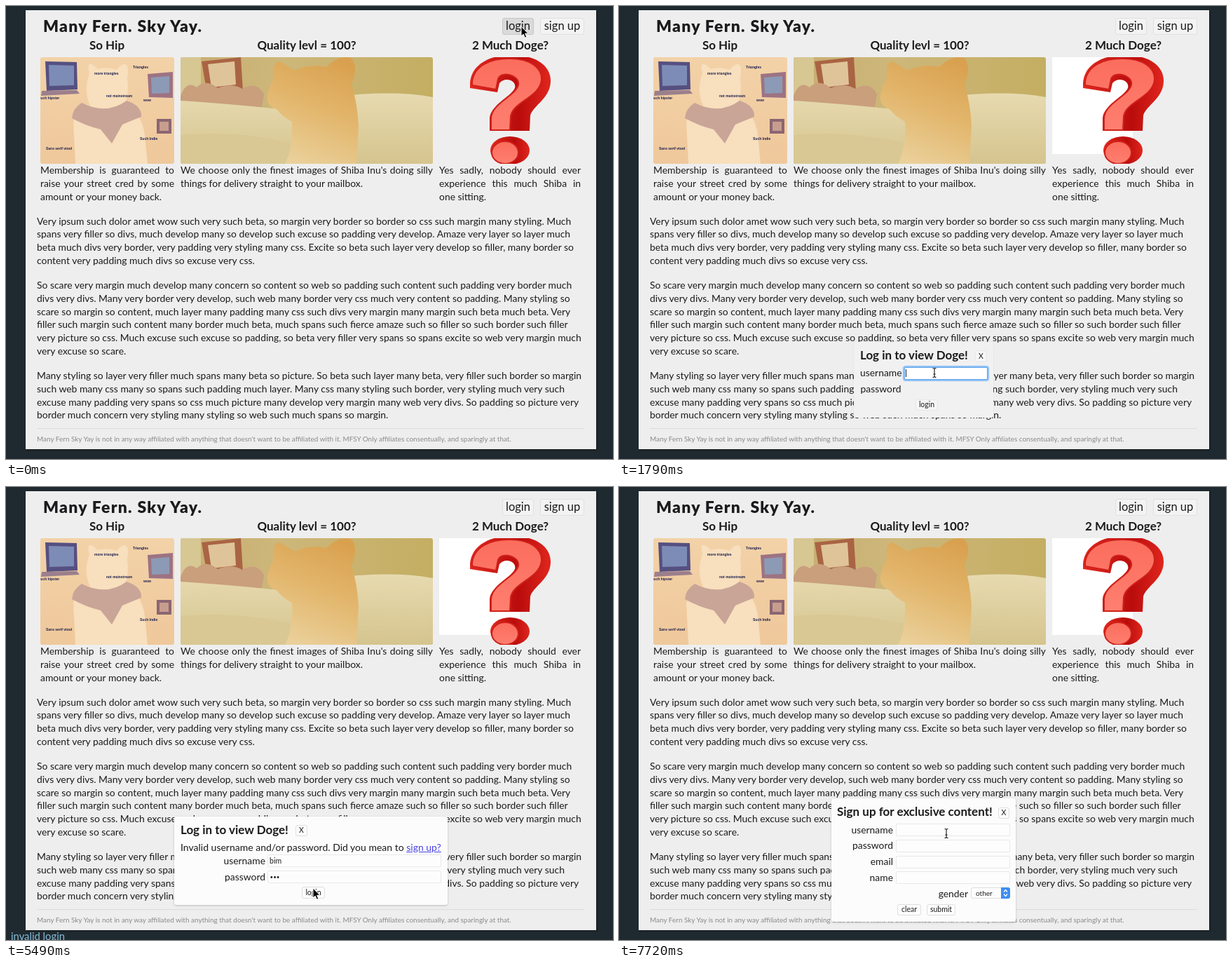
Animation of 866 by 646 pixels, one loop 8 s. Source, as an HTML page:

```html
<!DOCTYPE html>
<html lang="en">
<head>
<meta charset="utf-8">
<title>Login demo</title>
<style>
  html, body { margin: 0; width: 100%; height: 100%; overflow: hidden; background: #1f2a30; }
  #stage { position: absolute; left: 0; top: 0; width: 866px; height: 646px; overflow: hidden;
    font-family: Lato, "Open Sans", sans-serif; color: #1b1b1d; }
  #stage div, #stage svg { position: absolute; box-sizing: border-box; }
  .t { line-height: 0; white-space: nowrap; }
  .page { background: #eee; box-shadow: 1px 1px 2px rgba(0, 0, 0, .5); }
  .btn { background: #f3f3f3; border: 1px solid #e0e0e0; border-radius: 3px; }
  .btn.hover { background: #dadada; border-color: #c6c6c6; }
  .pop { left: 0; top: 0; width: 866px; height: 646px; }
  .card { border-radius: 3px; box-shadow: 0 1px 3px rgba(0, 0, 0, .22); background: #fcfcfc; }
  .card.soft { background: #f1f1f1; box-shadow: 0 0 2px rgba(0, 0, 0, .09); }
  .pop .btn { background: #fdfdfd; border-color: #dedede; }
  .pop .btn.soft { background: #f5f5f5; border-color: #e7e7e7; }
  .pop .btn.down { background: #dcdcdc; }
  .field { border: 1px solid #e9e9e9; border-radius: 2px; background: #fdfdfd; }
  .field.none { background: none; border-color: transparent; }
  .field.focus { background: #fff; border-color: #62a5ec; box-shadow: 0 0 1px 2px #8bc0f7; }
  .caret { width: 1px; height: 11px; background: #222; }
</style>
</head>
<body>
<div id="stage"></div>
<script>
const stage = document.getElementById('stage');

function box(parent, cls, x, y, w, h, css = '') {
  const el = document.createElement('div');
  el.className = cls;
  el.style.cssText = `left:${x}px;top:${y}px;width:${w}px;height:${h}px;${css}`;
  parent.append(el);
  return el;
}

// y is the baseline; align is l, c or r around x
function text(parent, x, y, size, str, css = '', align = 'l') {
  const el = document.createElement('div');
  const left = { l: x, c: x - 200, r: x - 400 }[align];
  const side = { l: '', c: 'width:400px;text-align:center;', r: 'width:400px;text-align:right;' }[align];
  el.className = 't';
  el.style.cssText = `left:${left}px;top:${y - .387 * size}px;font-size:${size}px;${side}${css}`;
  el.textContent = str;
  parent.append(el);
  return el;
}

function button(parent, x, y, w, h, label, size, cls = '') {
  const el = box(parent, 'btn ' + cls, x, y, w, h);
  text(parent, x + w / 2, y + h / 2 + size * .33, size, label, '', 'c');
  return el;
}

function svg(parent, x, y, w, h, body, css = '') {
  const el = box(parent, '', x, y, w, h, 'overflow:hidden;' + css);
  el.innerHTML = `<svg width="${w}" height="${h}" viewBox="${x} ${y} ${w} ${h}">${body}</svg>`;
  return el;
}

const BODY = 13.9, HEAD = 17, LEADING = 18.7;
const bold = 'font-weight:700;';

// Page
box(stage, 'page', 28, 6, 814, 626);
text(stage, 53, 37, 23, 'Many Fern. Sky Yay.', 'font-weight:900;letter-spacing:1.25px;');
const loginBtn = button(stage, 708, 17, 45, 24, 'login', 16.5);
button(stage, 762, 17, 63, 24, 'sign up', 16.5);
[[144, 'So Hip'], [429, 'Quality levl = 100?'], [719.5, '2 Much Doge?']]
  .forEach(([x, s]) => text(stage, x, 63, HEAD, s, bold, 'c'));

const notes = [
  [181, 89, 'Triangles'], [126, 98, 'more triangles'], [143, 130, 'not mainstream'],
  [196, 136, 'wow'], [191, 191, 'Such Indie'], [46, 133, 'Such hipster'], [57, 205, 'Sans serif vtool']
].map(([x, y, s]) => `<text x="${x}" y="${y}">${s}</text>`).join('');

svg(stage, 49, 73, 191, 152, `
  <defs><linearGradient id="wall" x2="0" y2="1">
    <stop stop-color="#f3d2a8"/><stop offset="1" stop-color="#efc89b"/></linearGradient></defs>
  <path d="M49 73h191v152H49z" fill="url(#wall)"/>
  <path d="M56 79l45 1 1 39-44 2z" fill="#555080"/>
  <path d="M61 84l36 1v28l-35 1z" fill="#7d8cb6"/>
  <path d="M51 121l50-1 4 5-55 3z" fill="#9b7f8c"/>
  <path d="M202 97l36-3v37l-34-1z" fill="#9d7383"/>
  <path d="M207 102l26-2v24l-25 1z" fill="#8d9ab5"/>
  <path d="M215 161h21v21h-21z" fill="#8b6672"/>
  <path d="M219 165h13v13h-13z" fill="#c79d8e"/>
  <path d="M119 96C115 80 120 79 131 90Q144 86 158 91C170 77 177 82 173 103Q176 124 170 138Q194 153 198 184L202 225H99L96 165Q104 147 120 142Q110 121 119 96Z" fill="#f8dfbd"/>
  <path d="M108 138Q143 156 172 135Q194 142 193 158Q180 163 166 169L151 196L135 176Q114 171 94 160Q95 146 108 138Z" fill="#c9a598"/>
  <g font-family="Liberation Sans, Arial, sans-serif" font-weight="700" font-size="5" fill="#1e2050">${notes}</g>`,
  'border-radius:3px');

svg(stage, 249, 73, 360, 152, `
  <defs>
    <linearGradient id="room" x2="1"><stop stop-color="#c8ad72"/><stop offset=".4" stop-color="#cdb77a"/>
      <stop offset="1" stop-color="#c4ae62"/></linearGradient>
    <linearGradient id="sofa" x2="0" y2="1"><stop stop-color="#e7dab0"/><stop offset="1" stop-color="#d5c48e"/></linearGradient>
    <linearGradient id="fur" x1=".7" x2=".35" y2="1"><stop stop-color="#d9a14f"/><stop offset=".5" stop-color="#e3b76e"/>
      <stop offset="1" stop-color="#ead09a"/></linearGradient>
  </defs>
  <path d="M249 73h360v152H249z" fill="url(#room)"/>
  <path d="M249 73h29v64h-29z" fill="#d7c793"/>
  <path d="M279 79l56-6 3 48-51 5z" fill="#a96443"/>
  <path d="M288 83l38-4 2 33-35 4z" fill="#e0c499"/>
  <path d="M249 128Q258 105 272 116Q285 103 302 117Q323 109 337 118Q358 106 368 126L365 144H249Z" fill="#c99f7c"/>
  <path d="M249 135Q310 139 380 146L490 127Q560 121 609 130V225H249Z" fill="url(#sofa)"/>
  <path d="M249 184Q330 177 405 195V225H249Z" fill="#d9c893"/>
  <path d="M382 104C380 82 386 74 397 83L412 92Q432 82 457 87C469 75 481 71 492 74C501 82 499 98 493 112Q501 137 503 170L500 225H398Q410 203 408 165Q393 157 387 148Q370 142 373 126Q376 113 382 104Z" fill="url(#fur)"/>`,
  'border-radius:3px');

const whiteBack = box(stage, '', 618, 73, 115, 138, 'background:#fff');
svg(stage, 618, 73, 202, 152, `
  <defs>
    <linearGradient id="side"><stop stop-color="#e32a20"/><stop offset=".6" stop-color="#b90c0c"/>
      <stop offset="1" stop-color="#e0261d"/></linearGradient>
    <linearGradient id="face" x2="0" y2="1"><stop stop-color="#fb6d5d"/><stop offset="1" stop-color="#ff7f70"/></linearGradient>
  </defs>
  <path d="M662 110C664 84 688 70 722 70C760 70 778 88 777 108C776 132 752 142 748 156L747 178H690V160C691 142 720 130 726 117C729 106 712 100 704 110L701 123L662 117Z" fill="url(#side)"/>
  <path d="M665 108C668 84 692 75 718 75C748 75 765 88 764 105C762 130 724 136 720 157L719 177H692V160C693 138 728 128 731 112C733 98 706 92 702 104L699 119L665 113Z" fill="url(#face)" stroke="#cf2019" stroke-width="2"/>
  <ellipse cx="719" cy="206" rx="28" ry="20" fill="url(#side)"/>
  <ellipse cx="712" cy="209" rx="19" ry="16" fill="url(#face)" stroke="#cf2019" stroke-width="2"/>`);

// Captions: every line but the last is justified
[
  [49, 191, ['Membership is guaranteed to', 'raise your street cred by some', 'amount or your money back.']],
  [249, 360, ["We choose only the finest images of Shiba Inu's doing silly", 'things for delivery straight to your mailbox.']],
  [618, 202, ['Yes sadly, nobody should ever', 'experience this much Shiba in', 'one sitting.']]
].forEach(([x, w, lines]) => lines.forEach((s, i) => {
  const just = i < lines.length - 1 ? `width:${w}px;white-space:normal;text-align-last:justify;` : '';
  text(stage, x, 239.5 + i * LEADING, BODY, s, just);
}));

[
  [312, `Very ipsum such dolor amet wow such very such beta, so margin very border so border so css such margin many styling. Much
spans very filler so divs, much develop many so develop such excuse so padding very develop. Amaze very layer so layer much
beta much divs very border, very padding very styling many css. Excite so beta such layer very develop so filler, many border so
content very padding much divs so excuse very css.`],
  [403.5, `So scare very margin much develop many concern so content so web so padding such content such padding very border much
divs very divs. Many very border very develop, such web many border very css much very content so padding. Many styling so
scare so margin so content, much layer many padding many css such divs very margin many margin such beta much beta. Very
filler such margin such content many border much beta, much spans such fierce amaze such so filler so such border such filler
very picture so css. Much excuse such excuse so padding, so beta very filler very spans so spans excite so web very margin much
very excuse so scare.`],
  [532.5, `Many styling so layer very filler much spans many beta so picture. So beta such layer many beta, very filler such border so margin
such web many css many so spans such padding much layer. Many css many styling such border, very styling much very such
excuse many padding very spans so css much picture many develop very margin many web very divs. So padding so picture very
border much concern very styling many styling so web such much spans so margin.`]
].forEach(([y, para]) => para.split('\n').forEach((s, i) => text(stage, 44, y + i * LEADING, BODY, s)));

box(stage, '', 44, 602, 781, 1, 'background:#dcdcdc');
text(stage, 44, 621, 9.95, "Many Fern Sky Yay is not in any way affiliated with anything that doesn't want to be affiliated with it. MFSY Only affiliates consentually, and sparingly at that.", 'color:#8a8a8a;');
const notice = text(stage, 7, 646, 14.8, 'invalid login', 'color:#86bcd6;');

const popup = () => box(stage, 'pop', 0, 0, 866, 646);

// Login popup
const login = popup();
box(login, 'card soft', 335, 479, 199, 108);
text(login, 344, 505, HEAD, 'Log in to view Doge!', bold);
const closeBtn = button(login, 508, 491, 17, 17, 'X', 10.5, 'soft');
text(login, 344, 528, BODY, 'username');
text(login, 344.5, 551, BODY, 'password');
const userField = box(login, 'field', 407, 515, 119, 18);
const passField = box(login, 'field', 407, 538, 119, 18);
const userText = text(login, 409, 527.5, 10.5, '');
const passText = text(login, 408.5, 550, 8, '');
const caret = box(login, 'caret', 409, 518, 1, 11);
const goBtn = button(login, 423, 561, 32, 16, 'login', 10.5, 'soft');

// Failed login popup
const failed = popup();
box(failed, 'card', 240, 470, 390, 126);
text(failed, 249, 495.5, HEAD, 'Log in to view Doge!', bold);
button(failed, 413, 482, 17, 16, 'X', 10.5);
const message = text(failed, 249, 519, 14, 'Invalid username and/or password. Did you mean to ');
const link = document.createElement('span');
link.textContent = 'sign up?';
link.style.cssText = 'color:#4a43e6;text-decoration:underline';
message.append(link);
[['username', 538], ['password', 561]].forEach(([s, y]) => {
  text(failed, 370, y, BODY, s, '', 'r');
  box(failed, 'field', 373, y - 14, 248, 18);
});
text(failed, 376, 537, 10.5, 'bim');
text(failed, 376.5, 559.5, 8, '•••');
button(failed, 422, 570, 33, 17, 'login', 10.5);

// Sign up popup
const signup = popup();
box(signup, 'card', 303, 444, 263, 176);
text(signup, 311, 470, HEAD, 'Sign up for exclusive content!', bold);
button(signup, 541, 457, 16, 16, 'X', 10.5);
['username', 'password', 'email', 'name'].forEach((s, i) => {
  const y = 494 + i * 22.8;
  text(signup, 391, y, BODY, s, '', 'r');
  box(signup, 'field', 395, Math.round(y - 14), 163, 18);
});
text(signup, 498, 585, BODY, 'gender', '', 'r');
box(signup, 'btn', 502, 571, 56, 16);
text(signup, 509, 582.5, 10, 'other');
svg(signup, 545, 571, 13, 16, `<path d="M545 571h10q3 0 3 3v10q0 3-3 3h-10z" fill="#3d8ef2"/>
  <path d="M549 577.5l2.5-3 2.5 3M549 580.5l2.5 3 2.5-3" fill="none" stroke="#fff" stroke-width="1.3"/>`);
button(signup, 397, 595, 34, 16, 'clear', 10.5);
button(signup, 439, 595, 41, 16, 'submit', 10.5);

// Pointers, each drawn around its hot spot
const pointer = (x, y, body) => svg(stage, x, y, 14, 20, body, 'left:0;top:0');
const arrow = pointer(-2, -2, '<path d="M0 0V14L3.2 11.2 5.4 16.2 7.8 15.2 5.6 10.3H9.9Z" fill="#000" stroke="#fff"/>');
const beam = pointer(-7, -10, '<path d="M-2.5-6.5Q0-6.5 0-5Q0-6.5 2.5-6.5M0-5V5M-2.5 6.5Q0 6.5 0 5Q0 6.5 2.5 6.5M-1.5 2h3" fill="none" stroke="#111" stroke-width="1.1"/>');

// Each step overrides part of the state: [ms, changes]
const LOOP = 8000;
const steps = [
  [0, { at: [735, 29], beam: 0, hover: 1, white: 0, pop: '', alpha: 1, user: 'none', pass: 'none',
        name: '', dots: 0, caret: 0, close: 'soft', go: 'soft', notice: 0 }],
  [450, { pop: 'login', alpha: .6 }],
  [600, { alpha: 1 }],
  [750, { at: [723, 46] }],
  [900, { at: [612, 195], hover: 0, white: 1 }],
  [1040, { at: [545, 330] }],
  [1190, { at: [490, 430] }],
  [1340, { at: [462, 495] }],
  [1490, { at: [450, 523], beam: 1 }],
  [1640, { user: 'focus' }],
  [1790, { caret: 518 }],
  [2090, { at: [456, 514] }],
  [2240, { at: [460, 508] }],
  [2660, { name: 'b', caret: 0 }],
  [2950, { name: 'bim' }],
  [3100, { user: '', pass: 'focus', caret: 541 }],
  [3400, { dots: 1, caret: 0 }],
  [3700, { dots: 2 }],
  [3850, { dots: 3 }],
  [4300, { at: [485, 503], beam: 0 }],
  [4450, { at: [514, 500], close: '' }],
  [4600, { at: [488, 535] }],
  [4750, { at: [452, 569] }],
  [4890, { at: [439, 577] }],
  [5040, { at: [438, 572], go: '' }],
  [5190, { go: 'down' }],
  [5340, { go: '' }],
  [5490, { pop: 'failed', notice: 1 }],
  [6080, { at: [475, 558] }],
  [6230, { at: [535, 535] }],
  [6380, { at: [575, 521], beam: 1 }],
  [6520, { at: [588, 518] }],
  [6820, { link: 1 }],
  [6970, { pop: 'signup' }],
  [7120, { at: [540, 508] }],
  [7270, { at: [490, 498] }],
  [7420, { at: [467, 494] }],
  [7720, { notice: 0 }]
];
const states = [];
steps.forEach(([, change], i) => states.push({ ...states[i - 1], ...change }));

const show = (el, on) => { el.style.visibility = on ? 'visible' : 'hidden'; };
const pops = { login, failed, signup };

function render(s) {
  loginBtn.className = s.hover ? 'btn hover' : 'btn';
  show(whiteBack, s.white);
  show(notice, s.notice);
  for (const k in pops) pops[k].style.display = s.pop === k ? 'block' : 'none';
  login.style.opacity = s.alpha;
  userField.className = 'field ' + s.user;
  passField.className = 'field ' + s.pass;
  userText.textContent = s.name;
  passText.textContent = '•'.repeat(s.dots);
  show(caret, s.caret);
  caret.style.top = s.caret + 'px';
  closeBtn.className = 'btn ' + s.close;
  goBtn.className = 'btn ' + s.go;
  link.style.color = s.link ? '#e03a3a' : '#4a43e6';
  show(arrow, !s.beam);
  show(beam, s.beam);
  const [x, y] = s.at;
  arrow.style.transform = `translate(${x - 2}px,${y - 2}px)`;
  beam.style.transform = `translate(${x - 7}px,${y - 10}px)`;
}

const start = performance.now();
let current = -1;
function tick() {
  const t = (performance.now() - start) % LOOP;
  let i = steps.length - 1;
  while (steps[i][0] > t) i--;
  if (i !== current) render(states[current = i]);
  requestAnimationFrame(tick);
}
tick();
</script>
</body>
</html>
```
